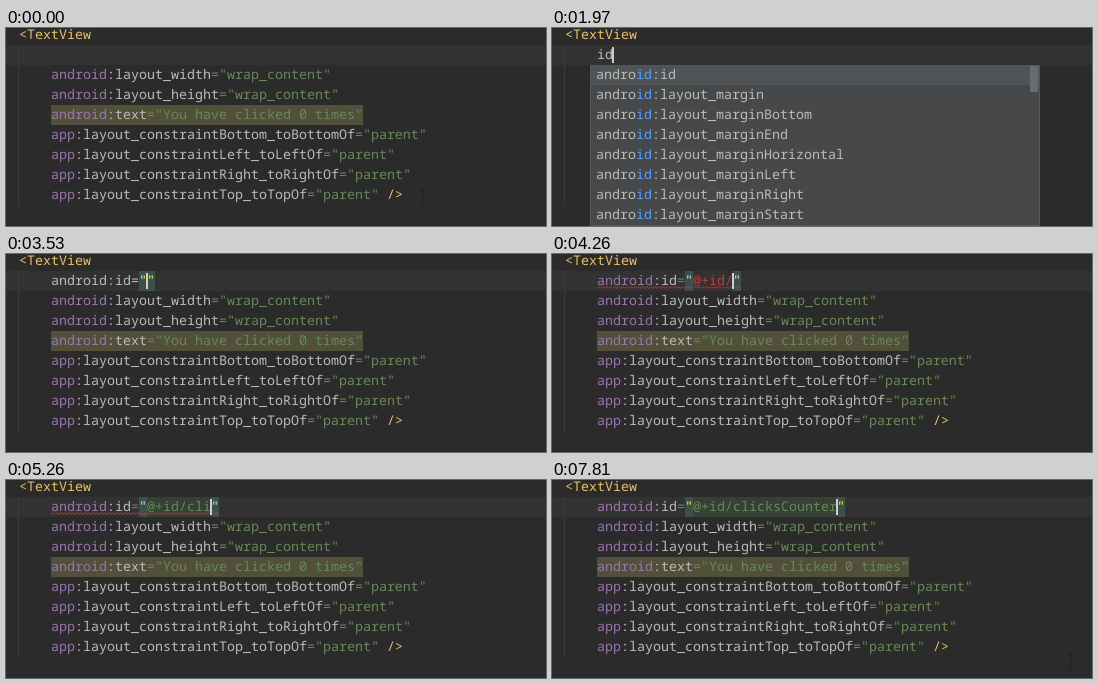
Animation, 540 px wide and 198 px high, one loop 8090 ms. Source, as an HTML page:

```html
<!DOCTYPE html>
<html lang="en">
<head>
<meta charset="utf-8">
<title>Adding an id to a TextView</title>
<style>
  html, body { margin: 0; width: 100%; height: 100%; overflow: hidden; background: #2b2b2b; }
  svg { display: block; }
  text {
    font: 13.3333px "Noto Sans Mono", "DejaVu Sans Mono", monospace;
    white-space: pre;
    text-rendering: geometricPrecision;
  }
</style>
</head>
<body>
<svg id="stage" width="540" height="198" viewBox="0 0 540 198"></svg>
<script>
const LOOP = 8090, LEFT = 45, CHAR = 8, ROW = 20;
const PURPLE = '#9876aa', PLAIN = '#bababa', GREEN = '#6a8759', GOLD = '#e8bf6a',
      RED = '#bc3f3c', BLUE = '#589df6', TEAL = '#3b514d', WHITE = '#d4dcd0', YELLOW = '#ffef28';

const attributes = [
  ['android:', 'layout_width', 'wrap_content'],
  ['android:', 'layout_height', 'wrap_content'],
  ['android:', 'text', 'You have clicked 0 times'],
  ['app:', 'layout_constraintBottom_toBottomOf', 'parent'],
  ['app:', 'layout_constraintLeft_toLeftOf', 'parent'],
  ['app:', 'layout_constraintRight_toRightOf', 'parent'],
  ['app:', 'layout_constraintTop_toTopOf', 'parent'],
];

// Completion popups; "match" is the highlighted part of each entry.
const names = {
  x: 38, w: 450, match: 'id', bar: true,
  items: ['id', ...['', 'Bottom', 'End', 'Horizontal', 'Left', 'Right', 'Start']
    .map(s => 'layout_margin' + s)].map(s => 'android:' + s),
};
const refs = { x: 134, w: 420, match: '', items: ['@+id/', '@android:id/', '@id/'] };
const ids = {
  x: 134, w: 420, match: '@+id/c',
  items: ['center', 'chain', 'checkbox', 'chronometer', 'content', 'contentPanel', 'cos', 'custom']
    .map(s => '@+id/' + s),
};

// Each step changes part of the editor state.
const steps = [
  [0, { word: '', value: null, caret: false, menu: null, prefix: PLAIN, ink: GREEN,
        fill: null, pair: TEAL, quote: YELLOW, wavy: false }],
  [960, { caret: true }],
  [1500, { caret: false }],
  [1830, { caret: true, word: 'i' }],
  [1970, { word: 'id', menu: names }],
  [2490, { menu: null }],
  [2560, { value: '' }],
  [2620, { menu: refs }],
  [3530, { menu: null }],
  [3600, { value: '@+id/', quote: WHITE }],
  [3930, { prefix: PURPLE, ink: RED }],
  [4260, { wavy: true }],
  [4920, { value: '@+id/c', ink: GREEN, fill: '#344134', pair: '#344134' }],
  [4990, { menu: ids }],
  [5060, { value: '@+id/cl' }],
  [5190, { menu: null, pair: TEAL }],
  ...[[5260, 3], [5330, 4], [5460, 5], [5590, 6], [5920, 7], [6070, 8],
      [6330, 9], [6430, 10], [6530, 11], [6630, 12], [6730, 13]]
    .map(([t, n]) => [t, { value: '@+id/' + 'clicksCounter'.slice(0, n) }]),
  [7330, { wavy: false, quote: YELLOW }],
];

const pointer = [[0, 417, 169], [330, 417, 169], [820, 177, 21], [900, 177, 21],
  [1000, 182, 16], [1150, 176, 21], [7330, 176, 21], [7810, 519, 182], [LOOP, 519, 182]];

const esc = s => s.replace(/&/g, '&amp;').replace(/</g, '&lt;');
const rect = (x, y, w, h, c) => `<rect x="${x}" y="${y}" width="${w}" height="${h}" fill="${c}"/>`;
const line = (x, y, ...runs) => `<text x="${x}" y="${y}">` +
  runs.map(([s, c]) => `<tspan fill="${c}">${esc(s)}</tspan>`).join('') + '</text>';

function code() {
  return rect(0, 0, 540, 198, '#2b2b2b') + rect(0, 17, 540, ROW, '#323232') +
    rect(12, 17, 1, 161, '#3a3a3a') + rect(LEFT, 77, 39 * CHAR, ROW, '#52503a') +
    line(13, 11, ['<TextView', GOLD]) +
    attributes.map(([ns, name, value], i) => line(LEFT, 51 + i * ROW,
      [ns.slice(0, -1), PURPLE], [':' + name, PLAIN], [`="${value}"`, GREEN],
      [i === 6 ? ' />' : '', GOLD])).join('');
}

function typed(s) {
  if (s.value === null) {
    return line(LEFT, 31, [s.word, PLAIN]) +
      (s.caret ? rect(LEFT - 1 + s.word.length * CHAR, 19, 2, 16, '#c8c8c8') : '');
  }
  const open = LEFT + 11 * CHAR, start = open + CHAR, end = start + s.value.length * CHAR;
  const waves = Math.round((end + CHAR - LEFT) / 4);
  return rect(open, 17, CHAR, ROW, s.pair) + rect(end, 17, CHAR, ROW, s.pair) +
    (s.fill ? rect(start, 17, end - start, ROW, s.fill) : '') +
    line(LEFT, 31, ['android', s.prefix], [':id', PLAIN], ['=', s.prefix === PLAIN ? PLAIN : GREEN],
      ['"', s.quote], [s.value, s.ink], ['"', s.quote]) +
    (s.wavy ? `<path d="M${LEFT} 34.5${'l2-2 2 2'.repeat(waves)}" fill="none" stroke="${RED}" stroke-width=".9"/>` : '') +
    rect(end - 1, 19, 2, 16, '#d0d0d0');
}

function popup({ x, w, match, bar, items }) {
  return rect(x, 37, w, items.length * ROW + 1, '#55585a') +
    rect(x + 1, 37, w - 2, items.length * ROW, '#46484a') +
    rect(x + 1, 37, w - 2, ROW, '#505456') +
    (bar ? rect(478, 38, 8, 26, '#696c6e') : '') +
    items.map((item, i) => {
      const at = item.indexOf(match), to = at + match.length;
      return line(x + 6, 51 + i * ROW,
        [item.slice(0, at), '#bbbbbb'], [match, BLUE], [item.slice(to), '#bbbbbb']);
    }).join('');
}

function ibeam(t) {
  if (t >= 1830 && t < 7330) return '';
  const i = pointer.findIndex(p => p[0] > t);
  const [t0, x0, y0] = pointer[i - 1], [t1, x1, y1] = pointer[i];
  const u = (t - t0) / (t1 - t0), k = u * u * (3 - 2 * u);
  const x = Math.round(x0 + (x1 - x0) * k), y = Math.round(y0 + (y1 - y0) * k);
  return `<path d="M${x - 3} ${y - 7.5}h6M${x - 3} ${y + 7.5}h6M${x - .5} ${y - 7.5}v15" stroke="#1f1f1f"/>`;
}

const stage = document.getElementById('stage'), base = code();
let shown = '';

function draw(now) {
  const t = now % LOOP;
  const s = Object.assign({}, ...steps.filter(p => p[0] <= t).map(p => p[1]));
  const picture = base + typed(s) + (s.menu ? popup(s.menu) : '') + ibeam(t);
  if (picture !== shown) stage.innerHTML = shown = picture;
}

let begin;
function tick(now) {
  begin ??= now;
  draw(now - begin);
  requestAnimationFrame(tick);
}
draw(0);
requestAnimationFrame(tick);
</script>
</body>
</html>
```
